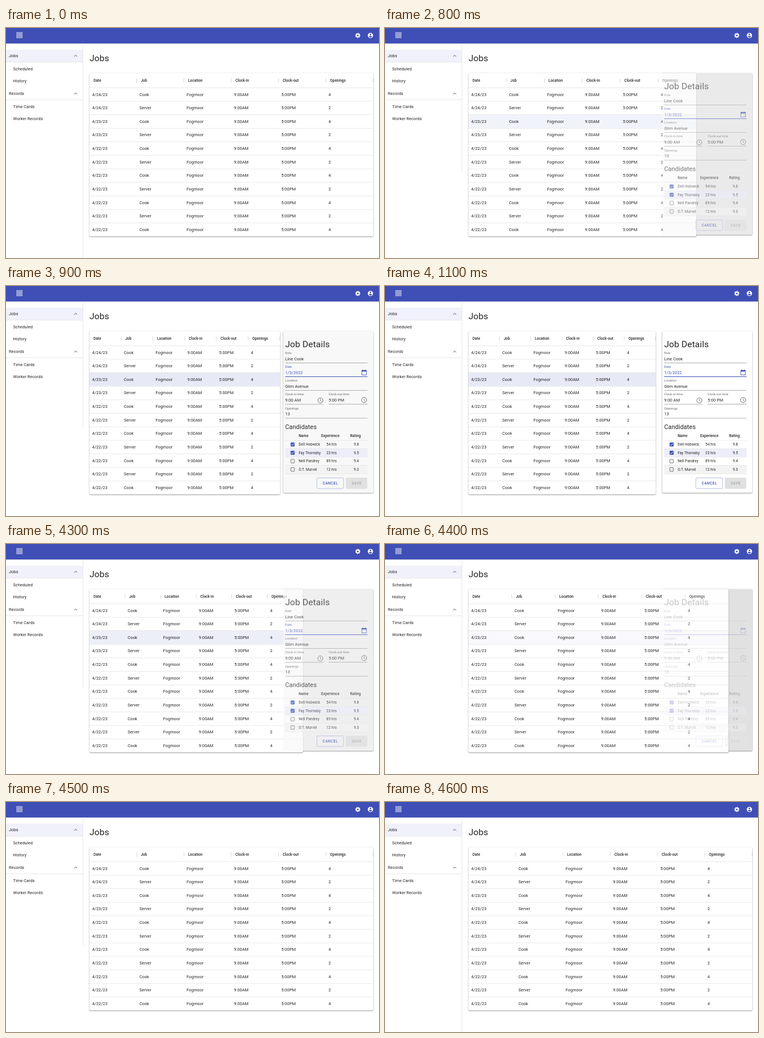
Animation of 652 by 402 pixels, one loop 5.2 s. Source, as an HTML page with a canvas:

```html
<!DOCTYPE html>
<html lang="en">
<head>
<meta charset="utf-8">
<title>Jobs</title>
<style>
  html, body { margin: 0; width: 100%; height: 100%; overflow: hidden; background: #fff; }
  canvas { display: block; width: 652px; height: 402px; }
</style>
</head>
<body>
<canvas id="stage"></canvas>
<script>
const W = 652, H = 402, LOOP = 5200;
const canvas = document.getElementById('stage');
const ctx = canvas.getContext('2d');
const dpr = window.devicePixelRatio || 1;
canvas.width = W * dpr;
canvas.height = H * dpr;

const INK = 'rgba(0,0,0,.87)', MUTED = 'rgba(0,0,0,.6)', LINE = '#e0e0e0';
const BLUE = '#3f51b5', BAR = '#3f4fb6', TINT = '#f0f1fa';
const BODY = 7.24, SMALL = 6.34, LABEL = 5.44, TITLE = 15.4;

// y is the middle of the capital letters
function text(str, x, y, { size = BODY, weight = 400, color = INK, gap = 0.07, align = 'left' } = {}) {
  ctx.font = `${weight} ${size}px Roboto, sans-serif`;
  ctx.letterSpacing = gap + 'px';
  ctx.textAlign = align;
  ctx.fillStyle = color;
  ctx.fillText(str, x, y + size * 0.355);
}

function rect(x, y, w, h, color) {
  ctx.fillStyle = color;
  ctx.fillRect(x, y, w, h);
}

function roundRect(x, y, w, h, r) {
  ctx.beginPath();
  ctx.roundRect(x, y, w, h, r);
}

function circle(x, y, r) {
  ctx.beginPath();
  ctx.arc(x, y, r, 0, Math.PI * 2);
}

function stroke(color, width, ...points) {
  ctx.strokeStyle = color;
  ctx.lineWidth = width;
  if (points.length) {
    ctx.beginPath();
    points.forEach(([x, y]) => ctx.lineTo(x, y));
  }
  ctx.stroke();
}

function card(x, y, w, h, fill) {
  ctx.save();
  ctx.shadowColor = 'rgba(0,0,0,.5)';
  ctx.shadowBlur = 2 * dpr;
  ctx.shadowOffsetY = 0.8 * dpr;
  roundRect(x, y, w, h, 2);
  ctx.fillStyle = fill;
  ctx.fill();
  ctx.restore();
}

function gear(x, y) {
  ctx.beginPath();
  for (let i = 0; i < 32; i++) {
    const r = i % 4 < 2 ? 4.6 : 3.5;
    const a = (i + 0.5) * Math.PI / 16;
    ctx.lineTo(x + r * Math.cos(a), y + r * Math.sin(a));
  }
  ctx.fillStyle = '#fff';
  ctx.fill();
  circle(x, y, 1.6);
  ctx.fillStyle = BAR;
  ctx.fill();
}

function account(x, y) {
  circle(x, y, 4.6);
  ctx.fillStyle = '#fff';
  ctx.fill();
  ctx.fillStyle = BAR;
  circle(x, y - 1.7, 1.4);
  ctx.fill();
  ctx.beginPath();
  ctx.ellipse(x, y + 2.1, 2.7, 1.4, 0, 0, Math.PI * 2);
  ctx.fill();
}

function calendar(x, y) {
  ctx.strokeStyle = BLUE;
  ctx.lineWidth = 0.9;
  ctx.strokeRect(x - 4, y - 3.5, 8, 8);
  rect(x - 4, y - 3.5, 8, 2, BLUE);
  rect(x - 2.7, y - 5, 1, 2, BLUE);
  rect(x + 1.7, y - 5, 1, 2, BLUE);
}

function clock(x, y) {
  circle(x, y, 4.5);
  stroke(MUTED, 0.9);
  stroke(MUTED, 0.8, [x, y - 2.7], [x, y + 0.2], [x + 2.1, y + 1.5]);
}

function checkbox(x, y, on) {
  if (on) {
    roundRect(x - 3.5, y - 3.5, 7, 7, 0.8);
    ctx.fillStyle = BLUE;
    ctx.fill();
    stroke('#fff', 0.9, [x - 2.2, y], [x - 0.7, y + 1.6], [x + 2.3, y - 1.6]);
  } else {
    roundRect(x - 3.1, y - 3.1, 6.2, 6.2, 0.7);
    stroke(MUTED, 0.9);
  }
}

function drawChrome(moving) {
  rect(0, 0, W, H, '#fff');
  rect(0, 27, W, 1, 'rgba(0,0,0,.1)');
  rect(0, 0, W, 27, BAR);
  rect(18, 7, 11, 11, '#929bd6');
  gear(615, 13);
  account(637, 13);

  rect(0, 38, 134, 21.5, TINT);
  rect(0, 59.5, 134, 0.7, LINE);
  rect(0, 125, 134, 0.7, LINE);
  rect(134, 27, 0.8, (moving ? 250 : H) - 27, '#e4e4e4');
  const items = [['Jobs', 5, 48.5], ['Scheduled', 12.5, 71], ['History', 12.5, 92.5],
    ['Records', 5, 114.5], ['Time Cards', 12.5, 137], ['Worker Records', 12.5, 158.5]];
  items.forEach(([label, x, y]) => {
    text(label, x, y);
    if (x === 5) stroke('#444', 0.9, [119.2, y + 1.6], [121.8, y - 1.1], [124.4, y + 1.6]);
  });
  text('Jobs', 146, 53, { size: TITLE, gap: 0.11 });
}

const HEADERS = ['Date', 'Job', 'Location', 'Clock-in', 'Clock-out', 'Openings'];
const DAYS = [24, 24, 23, 23];

function drawTable(open) {
  const x = 146, y = 79, w = 496 - 169 * open, col = w / 6, rowH = 23.64;
  card(x, y, w, 285.3, '#fff');
  HEADERS.forEach((label, i) => {
    text(label, x + 7 + i * col, 92, { size: SMALL, weight: 500 });
    rect(x - 0.7 + (i + 1) * col, 88, 0.8, 7.5, '#cfcfcf');
  });
  for (let row = 0; row < 11; row++) {
    const top = 104 + row * rowH;
    if (row === 2) rect(x, top, w, rowH, `rgba(63,81,181,${0.125 * open})`);
    rect(x, top, w, 0.7, LINE);
    const even = row % 2 === 0;
    const cells = [`4/${DAYS[row] || 22}/23`, even ? 'Cook' : 'Server', 'Fogmoor',
      '9:00AM', '5:00PM', even ? '4' : '2'];
    cells.forEach((cell, i) => text(cell, x + 4.5 + i * col, top + 12));
  }
}

function field(label, value, x, right, y, color = MUTED) {
  const active = color === BLUE;
  text(label, x, y, { size: LABEL, color });
  text(value, x, y + 10, { color: active ? BLUE : INK });
  rect(x, y + 17, right - x, active ? 1 : 0.7, active ? BLUE : '#8c8c8c');
}

const PEOPLE = [['Dell Hobwick', 54, '9.8'], ['Fay Thornsby', 23, '9.5'],
  ['Nell Pandrey', 89, '9.4'], ['O.T. Murvel', 12, '9.3']];

function drawPanel(alpha, moving) {
  ctx.save();
  ctx.globalAlpha = alpha;
  if (moving) {
    roundRect(484.5, 79, 157.5, 282.5, 2);
    ctx.fillStyle = '#f9f9f9';
    ctx.fill();
  } else {
    card(484.5, 79, 157.5, 282.5, '#fff');
  }

  text('Job Details', 488, 101.5, { size: TITLE, gap: 0.11 });
  field('Role', 'Line Cook', 488, 632, 117);
  field('Date', '1/3/2022', 488, 632, 141, BLUE);
  calendar(626, 151);
  field('Location', 'Glim Avenue', 488, 632, 165);
  field('Clock-in time', '9:00 AM', 488, 555, 189.5);
  clock(549.5, 200);
  field('Clock-out time', '5:00 PM', 564, 632, 189);
  clock(626, 199.3);
  field('Openings', '13', 488, 632, 213.7);

  text('Candidates', 488, 246, { size: 10.9, gap: 0.02 });
  const head = { size: SMALL, weight: 500 };
  text('Name', 511.5, 261.7, head);
  text('Experience', 551, 261.7, head);
  text('Rating', 601.5, 261.7, head);
  PEOPLE.forEach(([name, hours, rating], i) => {
    const y = 277 + i * 14.55;
    if (i % 2) rect(488, y - 7.2, 144, 14.5, i === 1 ? '#eceefa' : '#f3f3f3');
    rect(488, y - 7.4, 144, 0.6, LINE);
    checkbox(501, y, i < 2);
    text(name, 511.5, y, { size: SMALL });
    text(hours + ' hrs', 560, y, { size: SMALL });
    text(rating, 608, y, { size: SMALL });
  });
  rect(488, 328, 144, 0.6, LINE);

  const button = { size: SMALL, weight: 500, gap: 0.5, align: 'center' };
  roundRect(543.4, 335.4, 46.6, 18.6, 1.8);
  stroke('#a3abdb', 0.8);
  text('CANCEL', 567, 345, { ...button, color: BLUE });
  roundRect(594, 335, 37.5, 19.4, 1.8);
  ctx.fillStyle = '#e0e0e0';
  ctx.fill();
  text('SAVE', 613, 345, { ...button, color: '#a6a6a6' });
  ctx.restore();
}

function ease(u) {
  u = Math.min(1, u);
  return u * u * (3 - 2 * u);
}

// Transitions take 300 ms and refresh every 100 ms
function stateAt(t) {
  const progress = (start, lead) => ease((Math.floor((t - start) / 100) * 100 + lead) / 300);
  if (t < 800 || t >= 4600) return { open: 0, moving: false };
  if (t < 1100) return { open: progress(800, 166), moving: true };
  if (t < 4300) return { open: 1, moving: false };
  return { open: 1 - progress(4300, 103), moving: true };
}

function draw(t) {
  const { open, moving } = stateAt(t);
  ctx.setTransform(dpr, 0, 0, dpr, 0, 0);
  drawChrome(moving);
  if (moving && open > 0 && open < 1) card(484.5, 79, 157.5, 282.5, '#d8d8d8');
  drawTable(open);
  if (open > 0) drawPanel(open, moving && open < 1);
}

function tick() {
  draw(performance.now() % LOOP);
  requestAnimationFrame(tick);
}
tick();
</script>
</body>
</html>
```
